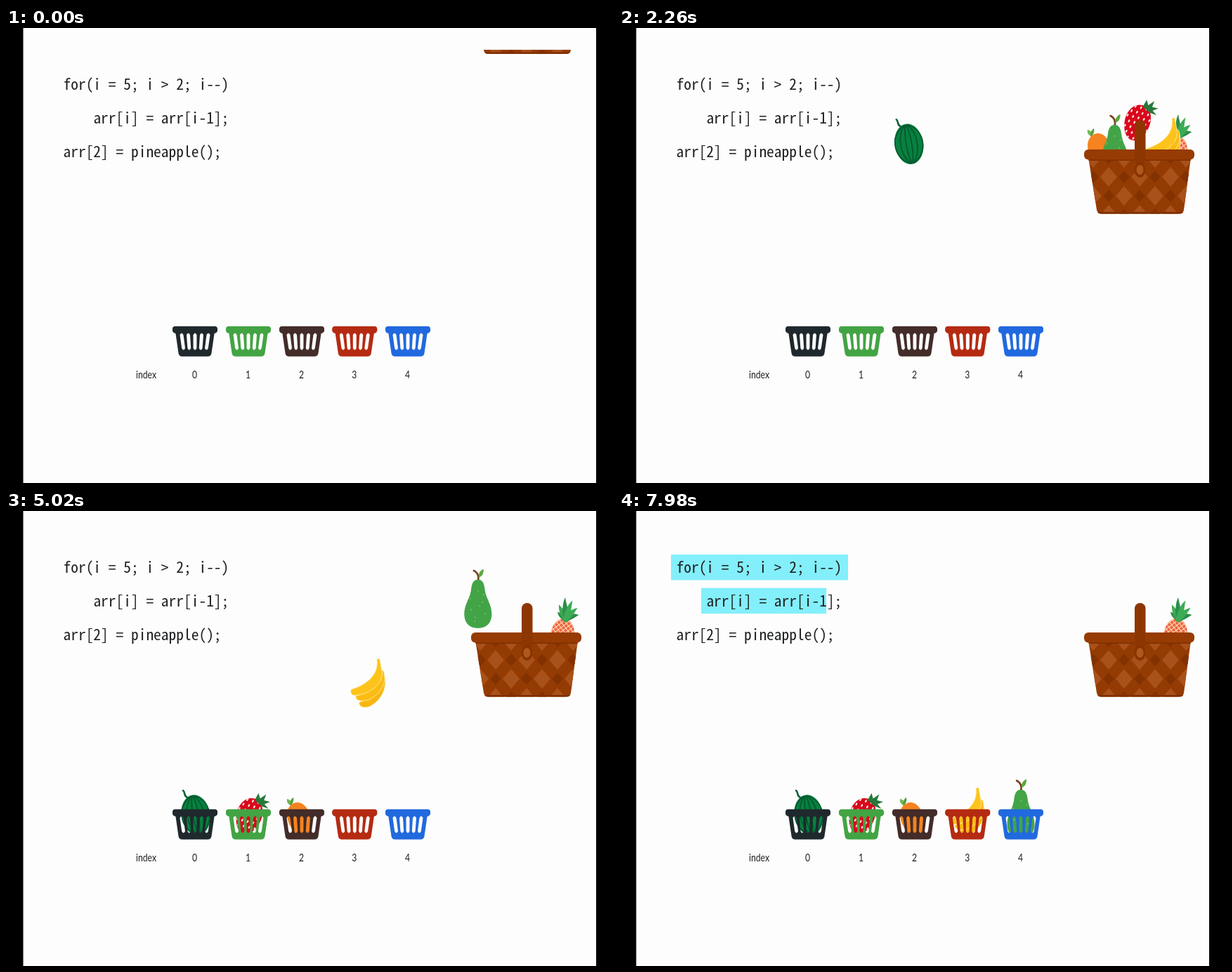
Recreate the animation shown at these times as an HTML page with a canvas. Size 864 px wide and 648 px high, loop 8000 ms.

```html
<!DOCTYPE html>
<html lang="en">
<head>
<meta charset="utf-8">
<title>Array insertion</title>
<style>
html, body { margin: 0; width: 100%; height: 100%; overflow: hidden; background: #000; }
canvas { display: block; }
</style>
</head>
<body>
<canvas id="stage" width="864" height="648"></canvas>
<script>
const ctx = document.getElementById('stage').getContext('2d');
const LOOP = 8000;
const SLIDE_TOP = 31;
const clamp = v => Math.max(0, Math.min(1, v));

function fillPath(d, color) {
  ctx.fillStyle = color;
  ctx.fill(new Path2D(d));
}

function strokePath(d, color, width) {
  ctx.strokeStyle = color;
  ctx.lineWidth = width;
  ctx.lineCap = 'round';
  ctx.stroke(new Path2D(d));
}

function roundBox(x, y, w, h, r, color) {
  ctx.fillStyle = color;
  ctx.beginPath();
  ctx.roundRect(x, y, w, h, r);
  ctx.fill();
}

function oval(x, y, rx, ry, turn, color) {
  ctx.fillStyle = color;
  ctx.beginPath();
  ctx.ellipse(x, y, rx, ry, turn, 0, Math.PI * 2);
  ctx.fill();
}

function at(x, y, draw) {
  ctx.save();
  ctx.translate(x, y);
  draw();
  ctx.restore();
}

function label(text, x, y, [font, tall], align) {
  at(x, y, () => {
    ctx.scale(1, tall);
    ctx.font = font;
    ctx.textAlign = align;
    ctx.fillStyle = '#1e2022';
    ctx.fillText(text, 0, 0);
  });
}

// The CJK mono face has half-em Latin letters; otherwise use a taller regular mono.
function codeFont() {
  const narrow = '"Noto Sans Mono CJK JP", "Noto Sans Mono CJK SC", monospace';
  ctx.font = '100px ' + narrow;
  return ctx.measureText('0').width < 55
    ? ['21.44px ' + narrow, 1]
    : ['17.9px "Noto Sans Mono", monospace', 1.25];
}

function watermelon() {
  strokePath('M-12,-25 C-18,-28 -14,-32 -18,-35', '#0b6138', 2.6);
  ctx.rotate(-0.17);
  oval(0, 0, 20.3, 29, 0, '#07813f');
  for (const bend of [-25, -15, -5, 5, 15, 25]) {
    strokePath(`M${bend * 0.15},-27 C${bend},-14 ${bend},14 ${bend * 0.15},27`, '#04592f', 1.8);
  }
}

function strawberry() {
  ctx.rotate(0.25);
  const body = 'M1,-26 C12,-27 19,-14 18,-1 C17,13 9,26 -1,26 C-12,26 -19,10 -18,-4 C-17,-17 -9,-26 1,-26Z';
  fillPath(body, '#d9071d');
  ctx.save();
  ctx.clip(new Path2D(body));
  for (let row = 0; row < 7; row++) {
    for (let col = -2; col < 3; col++) {
      oval(col * 8 + (row % 2) * 4, row * 7.5 - 22, 1.2, 2.1, 0.25, '#ffe9df');
    }
  }
  ctx.restore();
  fillPath('M2,-24 L5,-35 L9,-28 L16,-36 L15,-27 L24,-27 L17,-22 L24,-17 L14,-18Z', '#27783a');
}

function orange() {
  fillPath('M-10,-18 C-19,-21 -17,-27 -17,-28 C-12,-27 -10,-24 -10,-18Z', '#74b651');
  fillPath('M-12,-18 C-14,-25 -10,-29 -8,-30 C-7,-25 -9,-21 -12,-18Z', '#4f9d45');
  fillPath('M-2,-23 C9,-23 17,-8 18,6 C18,18 12,25 6,25 C-6,24 -17,8 -17,-6 C-17,-16 -10,-23 -2,-23Z', '#f58320');
}

function banana() {
  const bunch = [
    ['M22,-14 C23,8 6,22 -13,27 C-15,34 -4,37 4,32 C21,22 28,2 22,-14Z', '#f8b611'],
    ['M18,-20 C18,0 0,14 -18,18 C-19,26 -8,27 2,23 C19,13 26,0 22,-16Z', '#fbbc13'],
    ['M12,-34 C15,-12 -2,2 -25,9 C-26,17 -22,18 -15,17 C5,14 23,-2 19,-18 L16,-35Z', '#fec31b']
  ];
  for (const [shape, color] of bunch) {
    fillPath(shape, color);
    strokePath(shape, '#fff0bd', 0.8);
  }
}

function pear() {
  strokePath('M0,-33 C2,-40 -1,-46 -6,-48', '#78401d', 2.6);
  fillPath('M1,-38 C0,-44 4,-49 8,-50 C8,-43 6,-40 1,-38Z', '#5aa83f');
  fillPath('M0,-35 C7,-35 9,-29 10,-19 C12,-7 20,1 19.5,15 C19,29 10,34 0,34 C-10,34 -19,29 -19.5,15 C-20,1 -12,-7 -10,-19 C-9,-29 -7,-35 0,-35Z', '#42a447');
  for (let i = 0; i < 9; i++) {
    oval(Math.sin(i * 2.3) * 11, i * 5.4 - 19, 0.8, 1, 0, '#8acb73');
  }
}

function pineapple() {
  ctx.save();
  ctx.rotate(0.12);
  const body = new Path2D();
  body.ellipse(0, 5, 16.5, 22, 0, 0, Math.PI * 2);
  ctx.fillStyle = '#ee6545';
  ctx.fill(body);
  ctx.clip(body);
  for (let i = -6; i < 7; i++) {
    strokePath(`M${i * 7 - 30},-30 l60,60 M${i * 7 + 30},-30 l-60,60`, '#ffd6ac', 1.1);
  }
  ctx.restore();
  at(4, -17, () => {
    for (const [turn, size, color] of [[-1.05, 15, '#2b8e4a'], [1.2, 19, '#2b8e4a'], [-0.55, 22, '#3dab55'],
      [0.75, 22, '#3dab55'], [-0.1, 30, '#2b8e4a'], [0.28, 27, '#3dab55']]) {
      ctx.save();
      ctx.rotate(turn);
      fillPath(`M-4,4 C-5,${-size * 0.4} -2,${-size * 0.8} 2,${-size} C3,${-size * 0.6} 6,-5 3,4Z`, color);
      ctx.restore();
    }
  });
}

function hamper() {
  const body = new Path2D('M668,184 H814 L804,259 Q803,264.5 798,264.5 H686 Q681,264.5 680,259Z');
  ctx.save();
  ctx.clip(body);
  ctx.fillStyle = '#943b03';
  ctx.fillRect(660, 180, 160, 90);
  for (let row = -1; row < 4; row++) {
    for (let col = -3; col < 4; col++) {
      at(741 + col * 44 + (row % 2 ? 22 : 0), 212 + row * 27, () => {
        fillPath('M-22,-9 L-14,0 L-22,9 L-30,0Z', '#823200');
        fillPath('M0,-14 L12,0 L0,14 L-12,0Z', '#a8511a');
      });
    }
  }
  ctx.fillStyle = '#7f2f00';
  ctx.fillRect(660, 186, 160, 3);
  ctx.fillRect(680, 262, 124, 3);
  ctx.restore();
  roundBox(662, 173, 157, 14.5, 6, '#963b03');
  roundBox(734, 131, 15.5, 65, 7.7, '#8e3602');
  oval(741.5, 202, 8, 11, 0, '#873400');
  oval(741.5, 202, 5, 7, 0, '#b0571a');
}

function crate(color) {
  const shape = new Path2D('M-28,432 H28 L23.5,463 Q23,467.7 18,467.7 H-18 Q-23,467.7 -23.5,463Z');
  for (let i = -2; i <= 2; i++) {
    const x = i * 9.5;
    const low = i * 8.2;
    shape.addPath(new Path2D(`M${x - 2.5},437 Q${x},432 ${x + 2.5},437 L${low + 2.4},456 Q${low},461 ${low - 2.4},456Z`));
  }
  ctx.fillStyle = color;
  ctx.fill(shape, 'evenodd');
  roundBox(-32, 424.7, 64, 9, 4, color);
  oval(-27.5, 430, 4.5, 5, 0, color);
  oval(27.5, 430, 4.5, 5, 0, color);
}

// Each key is [time, x, y]; drawn from back to front.
const fruits = [
  [watermelon, [[1250, 728, 176], [1720, 590, 85], [2260, 413, 165], [3050, 270, 433]]],
  [banana, [[3850, 775, 163], [3900, 771, 147], [4340, 650, 108], [5020, 516, 245], [5650, 496, 429]]],
  [strawberry, [[2150, 756, 172], [2260, 738, 135], [2590, 620, 98], [3150, 430, 180], [3900, 346, 411], [3960, 346, 434.5]]],
  [orange, [[3000, 684, 173], [3400, 600, 105], [3900, 516, 203], [4800, 417, 438]]],
  [pear, [[4800, 705.5, 173], [5020, 672, 133], [5280, 620, 108], [5700, 580, 200], [6600, 572, 432]]]
];

// Smooth curve through timed keys.
function along(keys, t) {
  const last = keys.length - 1;
  if (t <= keys[0][0]) return keys[0].slice(1);
  if (t >= keys[last][0]) return keys[last].slice(1);
  const i = keys.findIndex(k => k[0] > t) - 1;
  const slope = (n, axis) => {
    const a = keys[Math.max(0, n - 1)];
    const b = keys[Math.min(last, n + 1)];
    return (b[axis] - a[axis]) / (b[0] - a[0]);
  };
  const [a, b] = [keys[i], keys[i + 1]];
  const span = b[0] - a[0];
  const u = (t - a[0]) / span;
  const v = 1 - u;
  return [1, 2].map(axis =>
    a[axis] * (1 + 2 * u) * v * v + b[axis] * (3 - 2 * u) * u * u +
    span * u * v * (slope(i, axis) * v - slope(i + 1, axis) * u));
}

const code = [
  [81.5, 'for(i = 5; i > 2; i--)'],
  [124.4, 'arr[i] = arr[i-1];'],
  [81.5, 'arr[2] = pineapple();']
];
const crates = [[269, '#1f292d'], [345, '#43a443'], [421, '#432c29'], [496.3, '#b52b12'], [572, '#2169df']];
const mono = codeFont();
const small = ['12.2px Lato, sans-serif', 1.28];

function wipe(x, y, start, t) {
  ctx.fillStyle = '#83effa';
  ctx.fillRect(x, y, (326 - x) * clamp((t - start) / 500), 36.5);
}

function render(t) {
  ctx.fillStyle = '#000';
  ctx.fillRect(0, 0, 864, 648);
  ctx.fillStyle = '#fdfdfd';
  ctx.fillRect(24.5, 0, 815.5, 648);

  wipe(74, 62, 7055, t);
  wipe(117, 109.7, 7555, t);
  code.forEach(([x, line], i) => label(line, x, 88 + i * 48, mono, 'left'));

  // The hamper enters from behind the slide's top edge.
  const drop = Math.min(0, -228 + t * 0.2622);
  ctx.save();
  ctx.beginPath();
  ctx.rect(24, SLIDE_TOP, 816, 648);
  ctx.clip();
  at(793, 170 + drop, pineapple);
  for (const [draw, keys] of fruits) {
    const [x, y] = along(keys, t);
    at(x, y + drop, draw);
  }
  at(0, drop, hamper);
  ctx.restore();

  label('index', 185, 498.5, small, 'left');
  crates.forEach(([x, color], i) => {
    at(x, 0, () => crate(color));
    label(String(i), x - 0.5, 498.5, small, 'center');
  });
}

const begin = performance.now();
function tick() {
  render((performance.now() - begin) % LOOP);
  requestAnimationFrame(tick);
}
tick();
</script>
</body>
</html>
```
